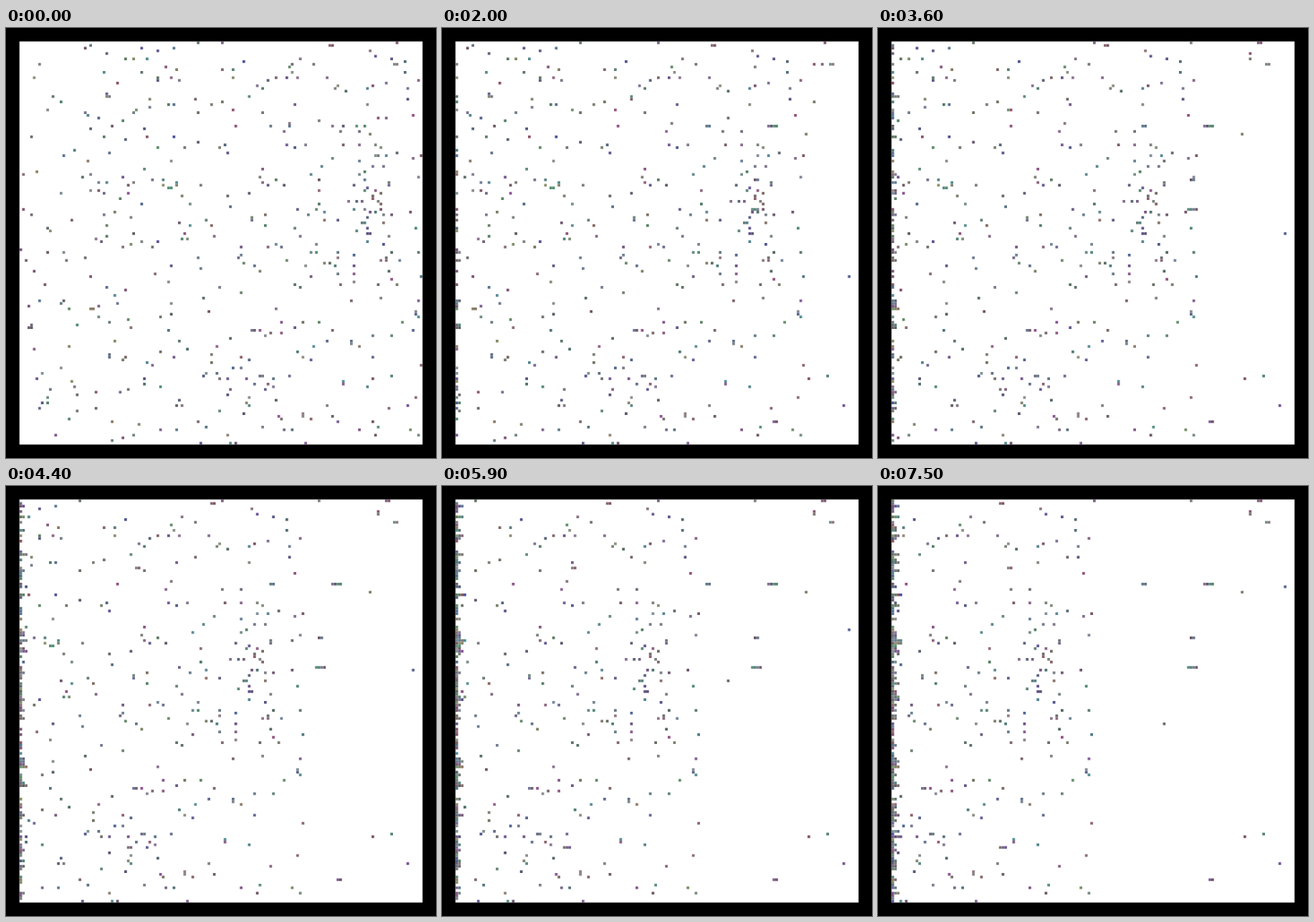
An HTML page with a canvas for the animation above (7600 ms loop, 600x600 px).

```html
<!DOCTYPE html>
<html>
<head>
<meta charset="utf-8">
<style>
html, body { margin: 0; width: 100%; height: 100%; overflow: hidden; background: #000; }
canvas { display: block; }
</style>
</head>
<body>
<canvas id="stage" width="600" height="600"></canvas>
<script>
const ctx = document.getElementById('stage').getContext('2d');
const EDGE = 18.75, SIZE = 3.75, CELLS = 150;
const STEP_MS = 100, STEPS = 76, DRIFTERS = 440;
const cell = p => Math.floor((p - EDGE) / SIZE);

// small seeded generator
let seed = 20417;
function rand() {
  seed = (seed + 0x6D2B79F5) | 0;
  let h = Math.imul(seed ^ (seed >>> 15), 1 | seed);
  h = (h + Math.imul(h ^ (h >>> 7), 61 | h)) ^ h;
  return ((h ^ (h >>> 14)) >>> 0) / 4294967296;
}
const pick = (min, count) => min + Math.floor(rand() * count);
// muted greys leaning to violet and teal
const tint = () => `rgb(${pick(78, 72)},${pick(82, 66)},${pick(96, 60)})`;

// dots that keep their column: x, first y, last y
const posts = [
  [302, 20], [541, 50], [264, 99], [182, 114], [370, 137], [456, 137],
  [508, 148], [437, 212], [433, 253], [538, 486], [512, 489], [170, 504],
  [560, 527], [463, 549], [437, 129, 20], [531, 125, 20], [520, 125, 35],
  [520, 178, 39], [568, 422, 20], [399, 51, 336]
].map(([x, y0, y1 = y0]) =>
  ({ col: cell(x), from: cell(y0), row: cell(y1), color: tint() }));

const rows = Array.from({ length: CELLS }, () => []);
for (const p of posts) rows[p.row].push({ col: p.col, fixed: true });

function addDrifter(col, row) {
  if (!rows[row].some(d => d.col === col)) rows[row].push({ col, color: tint() });
}
for (let i = 0; i < DRIFTERS; i++) addDrifter(pick(0, CELLS), pick(0, CELLS));
// a denser knot on the right
for (let i = 0; i < 16; i++) addDrifter(pick(127, 9), pick(52, 23));
for (const row of rows) row.sort((a, b) => a.col - b.col);

function dot(col, row, color) {
  ctx.fillStyle = color;
  ctx.fillRect(EDGE + col * SIZE, EDGE + row * SIZE, SIZE, SIZE);
}

function draw(step) {
  ctx.fillStyle = '#000';
  ctx.fillRect(0, 0, 600, 600);
  ctx.fillStyle = '#fff';
  ctx.fillRect(EDGE, EDGE, CELLS * SIZE, CELLS * SIZE);

  // drifters slide left and queue up behind the wall or a post
  rows.forEach((row, r) => {
    let last = -1;
    for (const d of row) {
      last = d.fixed ? d.col : Math.max(d.col - step, last + 1);
      if (!d.fixed) dot(last, r, d.color);
    }
  });
  for (const p of posts) {
    const way = p.row - p.from;
    dot(p.col, p.from + Math.sign(way) * Math.min(Math.abs(way), step), p.color);
  }
}

const start = performance.now();
function frame() {
  const t = Math.max(0, performance.now() - start);
  draw(Math.floor(t / STEP_MS) % STEPS);
  requestAnimationFrame(frame);
}
frame();
</script>
</body>
</html>
```
